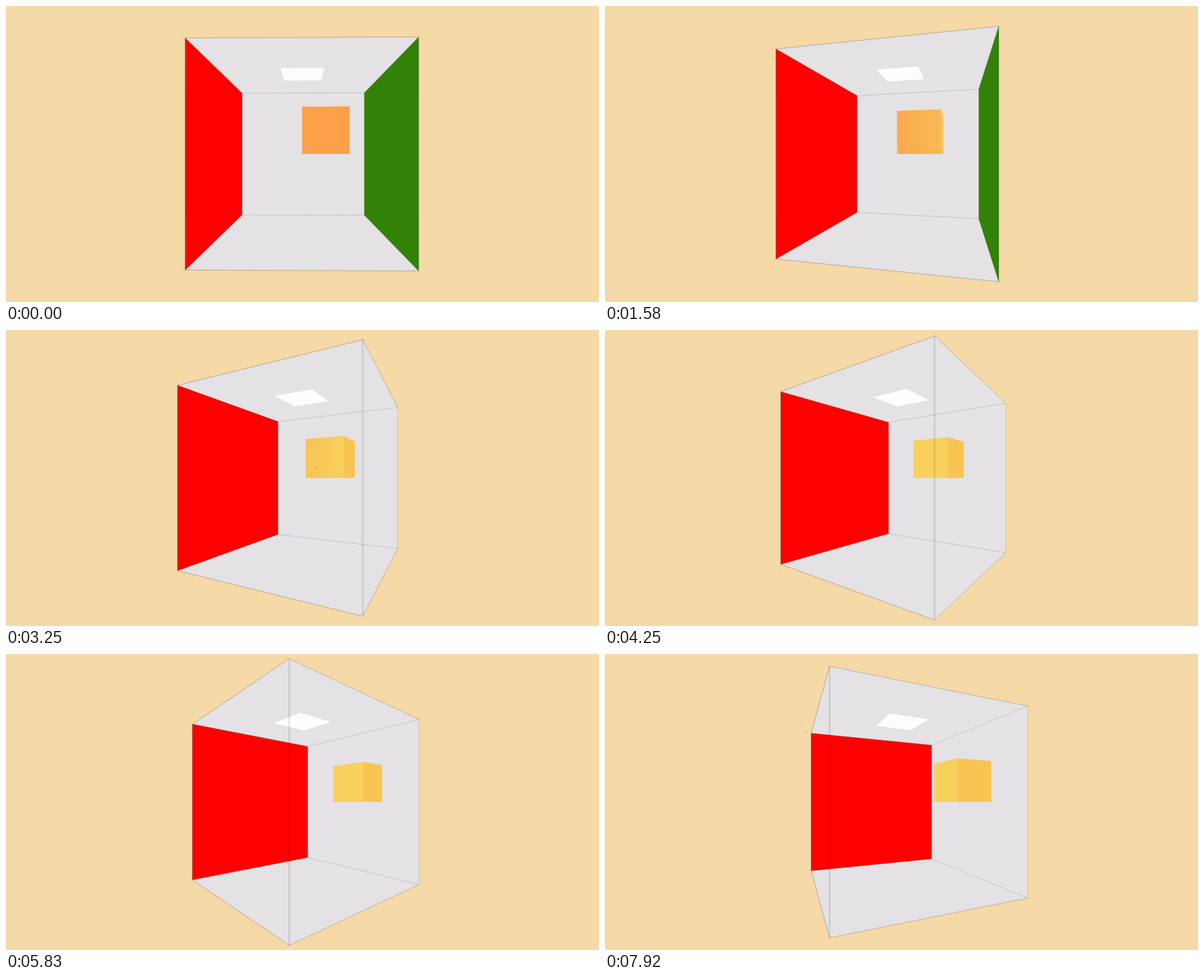
An HTML page with a canvas that plays this animation: 768x384 px, repeating every 8 s.

```html
<!DOCTYPE html>
<html lang="en">
<head>
<meta charset="utf-8">
<title>Rotating room</title>
<style>
  html, body { margin: 0; width: 100%; height: 100%; overflow: hidden; background: #f5d9a6; }
  canvas { display: block; }
</style>
</head>
<body>
<canvas id="stage" width="768" height="384"></canvas>
<script>
const ctx = document.getElementById('stage').getContext('2d');
const LOOP = 8000, FPS = 12;
const CAMERA = 3.2;
const FOCAL = 192 / Math.tan(Math.PI / 6);
const GREY = '#e4e2e5';

const clamp = v => Math.max(0, Math.min(1, v));

// A slow start, then a steady turn with a slight sway
const turn = step => Math.max(
  .009 + .01 * step,
  .0125 * step - .0197 - .005 * Math.cos(.085 * (step - 75)));

function draw(time) {
  const angle = turn(Math.floor((time + 4) / 1000 * FPS));
  const cos = Math.cos(angle), sin = Math.sin(angle);
  const cameraX = CAMERA * sin;

  const project = ([x, y, z]) => {
    const scale = FOCAL / (CAMERA - z * cos - x * sin);
    return [384 + (x * cos - z * sin) * scale, 192 - y * scale];
  };
  const trace = points => {
    ctx.beginPath();
    points.forEach(p => ctx.lineTo(...project(p)));
  };
  const face = (color, ...points) => {
    trace(points);
    ctx.fillStyle = color;
    ctx.fill();
  };
  const level = (color, y, r) =>
    face(color, [-r, y, r], [r, y, r], [r, y, -r], [-r, y, -r]);
  const wall = (color, x0, z0, x1, z1, bottom, top) =>
    face(color, [x0, bottom, z0], [x1, bottom, z1], [x1, top, z1], [x0, top, z0]);
  const edge = (alpha, a, b) => {
    trace([a, b]);
    ctx.strokeStyle = `rgba(40,50,40,${alpha})`;
    ctx.stroke();
  };
  const post = (alpha, x, z) => edge(alpha, [x, -1, z], [x, 1, z]);
  const rails = (alpha, x0, z0, x1, z1) => {
    for (const y of [-1, 1]) edge(alpha, [x0, y, z0], [x1, y, z1]);
  };

  ctx.fillStyle = '#f5d9a6';
  ctx.fillRect(0, 0, 768, 384);

  level(GREY, 1, 1);
  level(GREY, -1, 1);
  wall(GREY, -1, -1, 1, -1, -1, 1);
  wall('#fe0000', -1, 1, -1, -1, -1, 1);
  if (cameraX < 1) wall('#328208', 1, 1, 1, -1, -1, 1);
  level('#fdfcfe', .99, .25);

  // Far edges lie behind the cube
  rails(.14, -1, -1, 1, -1);
  rails(.25, -1, -1, -1, 1);
  post(.3, -1, -1);
  post(.12, 1, -1);

  // The cube slides at constant speed, bounces, and sinks into the back wall
  const front = -.722 + Math.abs(1.27 * (angle - .009) - 1.222);
  const back = Math.max(-1, front - .5);
  const tone = k => `rgb(${251 - 3 * k},${160 + 48 * k},${74 + 18 * k})`;
  const shade = ctx.createLinearGradient(
    project([0, 0, front])[0], 0, project([.5, 0, front])[0], 0);
  shade.addColorStop(0, tone(clamp((angle - .13) / .47)));
  shade.addColorStop(1, tone(clamp(angle / .42)));
  if (cameraX > .5) wall('#f9c550', .5, front, .5, back, 0, .5);
  wall(shade, 0, front, .5, front, 0, .5);

  rails(.26, -1, 1, 1, 1);
  rails(.22, 1, 1, 1, -1);
  post(.35, -1, 1);
  post(.26, 1, 1);
}

const start = performance.now();
function tick() {
  draw((performance.now() - start) % LOOP);
  requestAnimationFrame(tick);
}
tick();
</script>
</body>
</html>
```
